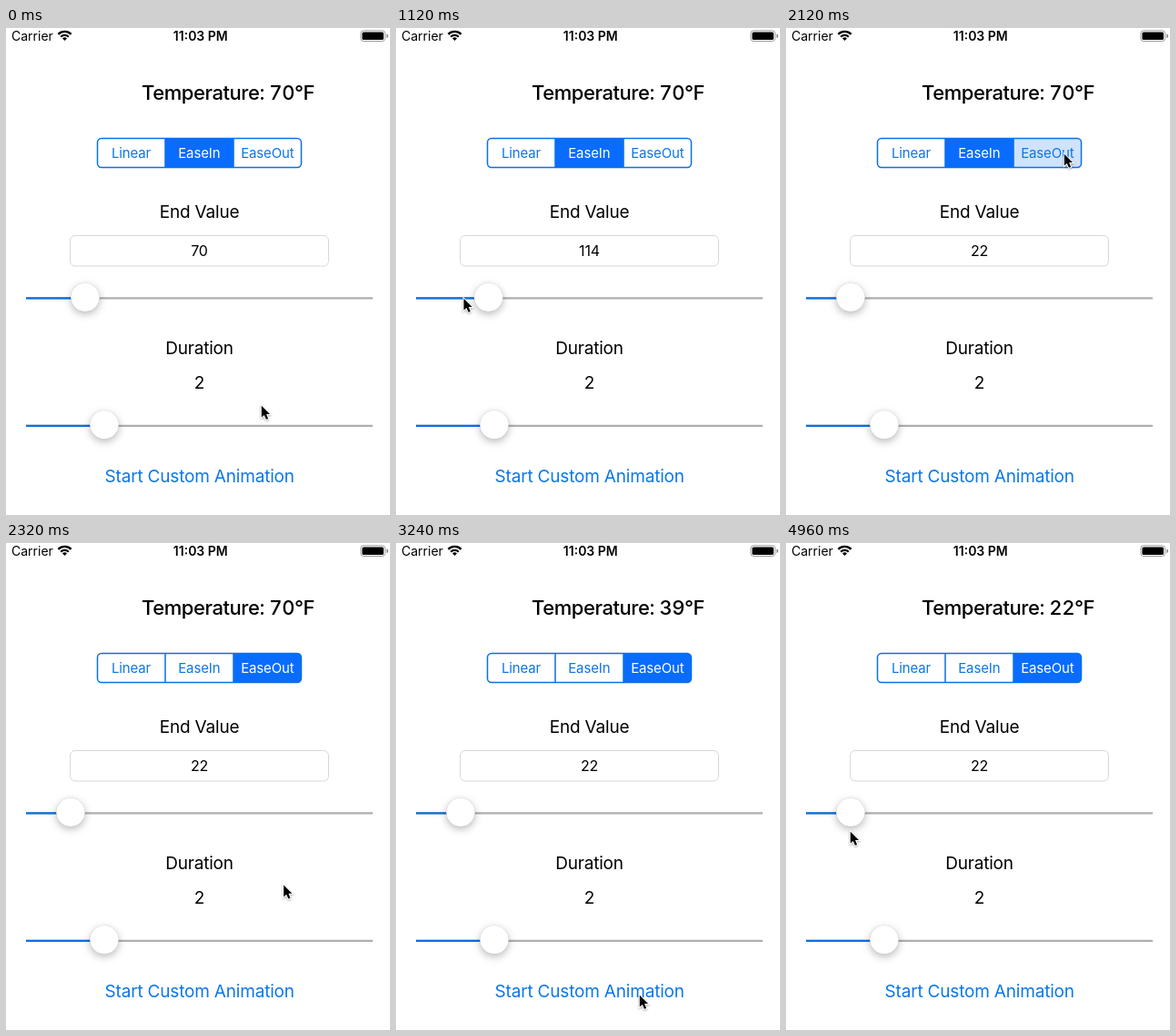
These frames come from a looping animation (422 px wide and 536 px high, 5000 ms). An HTML page:

```html
<!DOCTYPE html>
<html lang="en">
<head>
<meta charset="utf-8">
<title>Custom animation demo</title>
<style>
  html, body { margin: 0; width: 100%; height: 100%; overflow: hidden; background: #fff; }
  svg { display: block; width: 422px; height: 536px; font: 19px Inter, "Open Sans", sans-serif; }
  text { letter-spacing: -.01em; }
  .mid { text-anchor: middle; }
  .blue { fill: #0b76ea; }
  .field, .track, .outline { fill: none; }
  .field { stroke: #d8d8d8; }
  .track { stroke: #afafaf; stroke-width: 2.3; }
  .track.on { stroke: #0b70e4; }
  .outline { stroke: #0b70e4; stroke-width: 1.5; }
  .seg text { font-size: 15px; }
  .status text { font-size: 14px; letter-spacing: 0; }
  #temp { font-size: 22px; font-weight: 500; letter-spacing: -.02em; font-variant-numeric: tabular-nums; }
  .thumb { fill: #fff; stroke: #0001; stroke-width: .6;
    filter: drop-shadow(0 .5px .6px #0003) drop-shadow(0 3px 4px #0004); }
  #cursor { stroke: #fff; stroke-width: 2; paint-order: stroke; filter: drop-shadow(0 1px 1px #0005); }
</style>
</head>
<body>
<svg viewBox="0 0 422 536">
  <g class="status">
    <text x="6" y="13.5">Carrier</text>
    <text class="mid" x="213.8" y="13.5" font-weight="600">11:03 PM</text>
    <g fill="none" stroke="#000" stroke-width="2.3">
      <path d="M57.4 6.9A10 10 0 0 1 71.6 6.9M60.2 9.7A6.1 6.1 0 0 1 68.8 9.7"/>
      <path d="M64.5 14L62 11.5A3.6 3.6 0 0 1 67 11.5Z" fill="#000" stroke="none"/>
    </g>
    <rect x="389.9" y="2.9" width="26.6" height="11.6" rx="3" fill="none" stroke="#999"/>
    <rect x="391.4" y="4.4" width="23.6" height="8.6" rx="1.6"/>
    <path d="M418 6.5a2.2 2.2 0 0 1 0 4.4z" fill="#999"/>
  </g>

  <text id="temp" x="149" y="79"></text>

  <g class="seg">
    <clipPath id="round"><rect x="100.5" y="121.5" width="224" height="32" rx="4.5"/></clipPath>
    <g clip-path="url(#round)">
      <rect id="easeInBox" x="175" y="121" width="75" height="33"/>
      <rect id="easeOutBox" x="250" y="121" width="75" height="33"/>
    </g>
    <rect class="outline" x="100.5" y="121.5" width="224" height="32" rx="4.5"/>
    <path class="outline" d="M175 121.5v32M250 121.5v32"/>
    <text class="mid blue" x="137.5" y="143">Linear</text>
    <text class="mid" id="easeInText" x="212.3" y="143">EaseIn</text>
    <text class="mid" id="easeOutText" x="287.3" y="143">EaseOut</text>
  </g>

  <text class="mid" x="212.5" y="209">End Value</text>
  <rect class="field" x="70.5" y="228.5" width="284" height="33.5" rx="5.5"/>
  <text class="mid" id="endValue" x="212.5" y="250.5" font-size="16"></text>
  <path class="track" d="M22 297.4H403"/>
  <path class="track on" id="fill"/>
  <circle class="thumb" id="thumb" cy="296.3" r="15.8"/>

  <text class="mid" x="212.5" y="358.5">Duration</text>
  <text class="mid" x="212.5" y="397">2</text>
  <path class="track" d="M22 437.9H403"/>
  <path class="track on" d="M22 437.9H108"/>
  <circle class="thumb" cx="108" cy="436.6" r="15.8"/>

  <text class="mid blue" id="start" x="212.7" y="499.5">Start Custom Animation</text>
  <path id="cursor" d="M.8 .8V13.6L3.8 10.9L5.9 15.8L8.1 14.9L6.1 10H10Z"/>
</svg>
<script>
const LOOP = 5000, STEP = 40;
const DRAG_START = 840, DRAG_END = 1440;
const PRESS_SEGMENT = 2120, SELECT = 2200;
const PRESS_BUTTON = 2760, RELEASE_BUTTON = 2880, FADE_END = 3240;
const COUNT_START = 2895, COUNT_END = 4895;

// Cursor moves: start time, end time, goal x, goal y; it rests in between.
const moves = [
  [0, 200, 268, 480],
  [200, 560, 247, 278],
  [560, 790, 59, 297],
  [DRAG_START, DRAG_END, 43, 297],
  [1720, PRESS_SEGMENT, 305, 138],
  [SELECT, 2400, 304, 505],
  [2600, PRESS_BUTTON, 267, 497],
  [4120, 4360, 291, 502],
  [4520, 4640, 180, -30],
  [4840, 4960, 70, 317]
];

const $ = id => document.getElementById(id);
const progress = (start, end, t) => Math.min(1, Math.max(0, (t - start) / (end - start)));
const smooth = p => p * p * (3 - 2 * p);

function cursorAt(t) {
  let x = 280, y = 415;
  for (const [start, end, goalX, goalY] of moves) {
    const p = smooth(progress(start, end, t));
    x += (goalX - x) * p;
    y += (goalY - y) * p;
  }
  return [x, y];
}

function paintSegment(name, selected, pressed) {
  $(name + 'Box').setAttribute('fill', selected ? '#0a6cff' : pressed ? '#cfe3fd' : '#fff');
  $(name + 'Text').setAttribute('fill', selected ? '#fff' : '#0b76ea');
}

function draw(t) {
  // The drag swings right before it settles on the left.
  const drag = progress(DRAG_START, DRAG_END, t);
  const swing = 22 * Math.sin(Math.PI * drag);
  const thumbX = 87 - 16 * smooth(drag) + swing;
  $('thumb').setAttribute('cx', thumbX);
  $('fill').setAttribute('d', `M22 297.4H${thumbX}`);
  $('endValue').textContent = Math.round(22 + 3 * (thumbX - 71));

  paintSegment('easeIn', t < SELECT, false);
  paintSegment('easeOut', t >= SELECT, t >= PRESS_SEGMENT);

  const left = 1 - progress(COUNT_START, COUNT_END, t);
  $('temp').textContent = `Temperature: ${Math.floor(22 + 48 * left ** 5.4)}°F`;

  const fade = progress(RELEASE_BUTTON, FADE_END, t);
  $('start').setAttribute('opacity', t < PRESS_BUTTON ? 1 : .2 + .8 * fade);

  const [x, y] = cursorAt(t);
  $('cursor').setAttribute('transform', `translate(${x + swing} ${y})`);
}

function tick() {
  const t = performance.now() % LOOP;
  draw(Math.floor(t / STEP) * STEP);
  requestAnimationFrame(tick);
}
tick();
</script>
</body>
</html>
```
